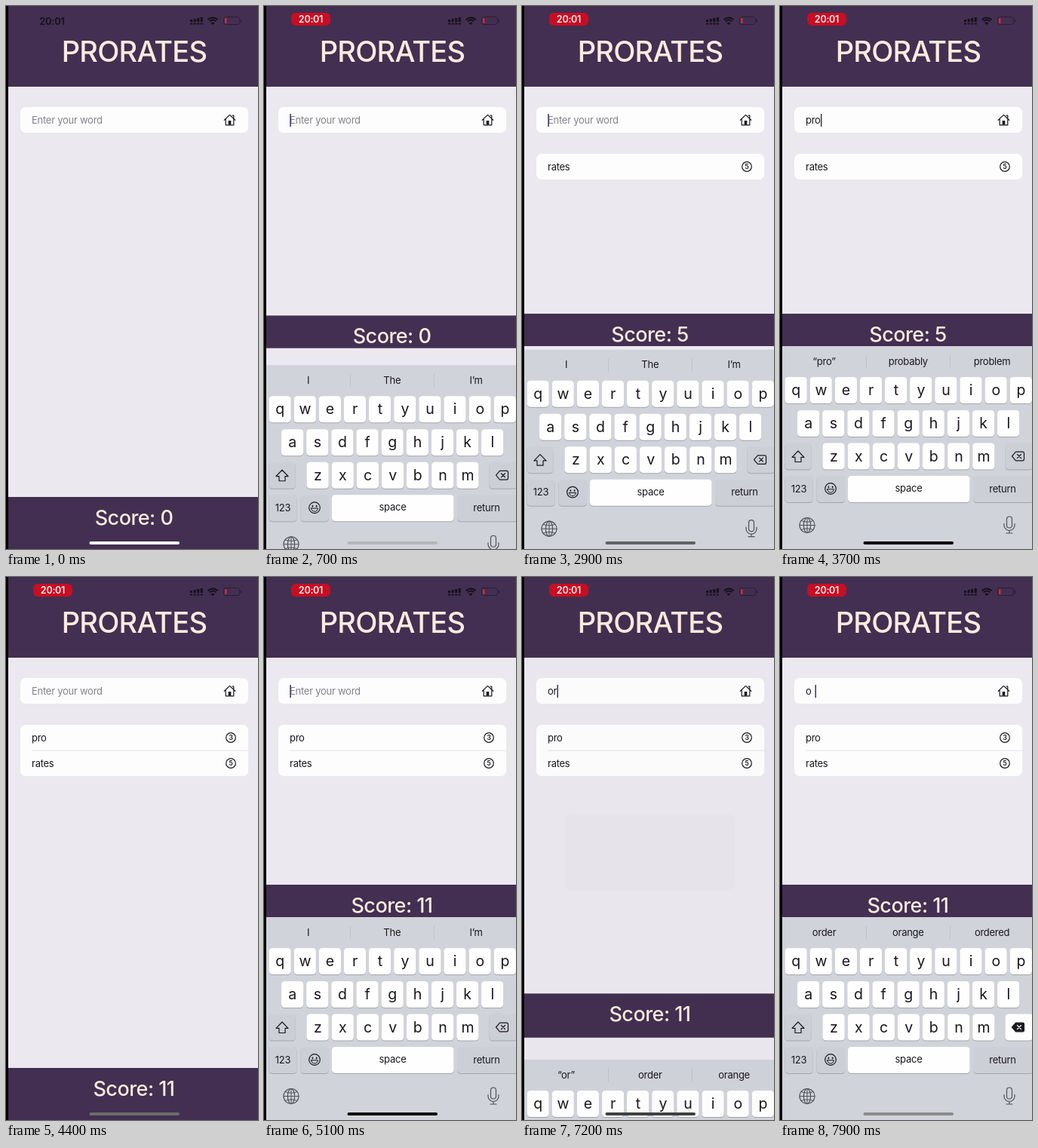
An HTML page with a canvas for the animation above (8000 ms loop, 334x720 px).

```html
<!DOCTYPE html>
<html lang="en">
<head>
<meta charset="utf-8">
<title>Word game</title>
<style>
html, body { margin: 0; width: 100%; height: 100%; overflow: hidden; background: #000; }
canvas { display: block; width: 334px; height: 720px; }
</style>
</head>
<body>
<canvas id="stage"></canvas>
<script>
const W = 334, H = 720, LOOP = 8000;
const PURPLE = '#432f51', CREAM = '#fbebde', PAGE = '#ebe9ef', INK = '#19181c';
const canvas = document.getElementById('stage');
const dpr = window.devicePixelRatio || 1;
canvas.width = W * dpr;
canvas.height = H * dpr;
const c = canvas.getContext('2d');

// Timeline: [time, value] steps
const TYPED = [
  [0, ''], [950, 'r'], [1100, 'ra'], [1300, 'rat'], [1450, 'rate'], [1650, 'rates'], [2150, ''],
  [3150, 'p'], [3350, 'pr'], [3550, 'pro'], [3900, ''], [5350, 'o'], [5600, 'or'], [7850, 'o']
];
const SCORES = [[0, 0], [2200, 5], [3950, 11]];
const SHOWS = [450, 2560, 4560, 7150];
const HIDES = [2100, 3850, 6100];
const ROWS = [{ word: 'rates', at: 2200 }, { word: 'pro', at: 3950 }];
const INDICATOR = [
  [0, 255], [500, 255], [1200, 0], [2250, 0], [2500, 230], [3200, 0], [4100, 0],
  [4600, 180], [5000, 15], [7100, 0], [7500, 255], [8000, 110]
];
const HINTS = {
  '': ['I', 'The', 'I’m'],
  r: ['“r”', 'really', 'right'],
  ra: ['“ra”', 'rather', 'rain'],
  rat: ['“rat”', 'rather', 'rate'],
  rate: ['“rate”', 'rated', 'rates'],
  rates: ['“rates”', 'rated', ''],
  p: ['“p”', 'please', 'people'],
  pr: ['“pr”', 'pretty', 'probably'],
  pro: ['“pro”', 'probably', 'problem'],
  o: ['order', 'orange', 'ordered'],
  or: ['“or”', 'order', 'orange']
};

const clamp = v => Math.max(0, Math.min(1, v));
const span = (t, start, length) => clamp((t - start) / length);
const easeOut = p => 1 - (1 - p) ** 3;
const easeBoth = p => p * p * (3 - 2 * p);
const mix = (a, b, p) => a + (b - a) * p;
const stepAt = (list, t) => list.filter(e => e[0] <= t).pop()?.[1] ?? list[0][1];

function tween(list, t) {
  const i = list.findIndex(e => e[0] > t);
  if (i < 0) return list[list.length - 1][1];
  const [a, b] = [list[i - 1], list[i]];
  return mix(a[1], b[1], (t - a[0]) / (b[0] - a[0]));
}

// Share of the way up for the keyboard and for the score bar
function lift(t) {
  const up = SHOWS.filter(s => s <= t).pop() ?? -1;
  const down = HIDES.filter(s => s <= t).pop() ?? -1;
  if (up < 0) return { keys: 0, bar: 0 };
  if (up > down) return { keys: easeOut(span(t, up, 460)), bar: easeOut(span(t, up, 320)) };
  return { keys: 1 - easeBoth(span(t, down, 260)), bar: 1 - easeBoth(span(t, down + 150, 300)) };
}

function rect(x, y, w, h, fill) {
  c.fillStyle = fill;
  c.fillRect(x, y, w, h);
}

function round(x, y, w, h, r, fill) {
  c.beginPath();
  c.roundRect(x, y, w, h, r);
  c.fillStyle = fill;
  c.fill();
}

function setFont(size, weight = 400, tight = -0.02) {
  c.font = `${weight} ${size}px Inter, Roboto, sans-serif`;
  c.letterSpacing = `${size * tight}px`;
}

function text(str, x, y, size, fill, { weight = 400, align = 'left', tight } = {}) {
  setFont(size, weight, tight);
  c.textAlign = align;
  c.textBaseline = 'alphabetic';
  c.fillStyle = fill;
  c.fillText(str, x, y + size * 0.36);
}

const center = (str, x, y, size, fill, weight = 400) =>
  text(str, x, y, size, fill, { weight, align: 'center' });

function stroke(d, x, y, color = INK, width = 1.2, fill) {
  const path = new Path2D(d);
  c.save();
  c.translate(x, y);
  c.lineWidth = width;
  c.lineJoin = c.lineCap = 'round';
  if (fill) { c.fillStyle = fill; c.fill(path); }
  c.strokeStyle = color;
  c.stroke(path);
  c.restore();
}

function ring(x, y, r, color = INK, width = 1.2) {
  c.beginPath();
  c.arc(x, y, r, 0, Math.PI * 2);
  c.lineWidth = width;
  c.strokeStyle = color;
  c.stroke();
}

function statusIcons() {
  const ink = '#17101d';
  for (let i = 0; i < 4; i++) {
    const x = 244 + i * 4.6;
    rect(x, 18 - i, 3, 3 + i, ink);
    rect(x, 22.5, 3, 2, ink);
  }
  for (const r of [8.6, 5.6]) {
    c.beginPath();
    c.arc(274, 24, r, -Math.PI * 0.77, -Math.PI * 0.23);
    c.lineWidth = 2;
    c.strokeStyle = ink;
    c.stroke();
  }
  c.beginPath();
  c.moveTo(274, 25);
  c.arc(274, 25, 3.4, -Math.PI * 0.77, -Math.PI * 0.23);
  c.fillStyle = ink;
  c.fill();
  c.beginPath();
  c.roundRect(288.5, 14.5, 21, 10, 3);
  c.lineWidth = 1;
  c.strokeStyle = '#2a1e33';
  c.stroke();
  round(290, 16, 2.5, 7, 1, '#e0262f');
  round(310.8, 17.5, 1.3, 4, 0.6, '#2a1e33');
}

function clock(t) {
  const on = span(t, 150, 200);
  c.globalAlpha = 1 - on;
  center('20:01', 61, 20, 13, '#17101d', 600);
  c.globalAlpha = on;
  round(36, 9, 52, 17, 6, '#c90d22');
  center('20:01', 62, 17.5, 12.5, '#fbeef0', 600);
  c.globalAlpha = 1;
}

function field(t) {
  round(19, 134, 302, 34, 7, '#fefdfe');
  const word = stepAt(TYPED, t);
  text(word || 'Enter your word', 34, 151.5, 13, word ? INK : '#828187');
  stroke('M-7.2 .3 L0 -6.6 L7.2 .3 M-5.3 -1 V6.8 H5.3 V-1 M3.6 -5.8 H5.3 V-2', 296.5, 151, INK, 1.2);
  rect(294.7, 152, 3.6, 5.5, INK);
  const focused = SHOWS.some((s, i) => t >= s && t < (HIDES[i] ?? LOOP));
  if (!focused) return;
  setFont(13);
  const end = 34 + c.measureText(stepAt(TYPED, t - 120)).width;
  rect(end + 0.3, 143, 1.5, 17, '#3d2f61');
}

function wordList(t) {
  const live = ROWS.filter(r => t >= r.at);
  if (!live.length) return;
  const grow = live.map(r => easeOut(span(t, r.at, 300)));
  const total = grow.reduce((a, b) => a + b, 0);
  c.save();
  c.globalAlpha = grow[0];
  round(19, 196, 302, 34 * Math.max(1, total), 7, '#fefdfe');
  live.forEach((row, i) => {
    const below = grow.slice(i + 1).reduce((a, b) => a + b, 0);
    const y = 213 + 34 * below;
    c.globalAlpha = grow[i];
    text(row.word, 34, y + 0.5, 13, INK);
    ring(298, y, 6.3);
    center(String(row.word.length), 298, y, 8.5, INK, 600);
    if (i) rect(34, 229.7, 287, 0.8, '#dcdbe0');
  });
  c.restore();
}

function scoreBar(t, up) {
  const top = mix(651, 408, up), bottom = mix(720, 451, up);
  rect(3, top, W - 3, bottom - top, PURPLE);
  center('Score: ' + stepAt(SCORES, t), 169.5, top + 27, 27, CREAM, 500);
}

function key(x, y, w, fill) {
  round(x, y + 1, w, 35, 4.5, '#a4a5ac');
  round(x, y, w, 35, 4.5, fill);
}

function letters(str, x, y) {
  [...str].forEach((ch, i) => {
    const left = x + i * 33.13;
    key(left, y, 29.2, '#fefefe');
    center(ch, left + 14.6, y + 17, 19.5, INK);
  });
}

function keyboard(t, up) {
  if (up <= 0) return;
  c.save();
  c.translate(0, (1 - up) * 269);
  rect(3, 451, W - 3, 269, '#d1d3da');
  HINTS[stepAt(TYPED, t)].forEach((hint, i) => center(hint, 58.5 + i * 111.3, 471, 13, INK));
  for (const x of [114, 225]) rect(x, 463, 0.8, 17, '#bcbec5');

  letters('qwertyuiop', 6.5, 492);
  letters('asdfghjkl', 23, 536);
  letters('zxcvbnm', 56.5, 579.5);
  const soft = '#cdcfd7', erasing = t >= 7800;
  key(6.5, 579.5, 35, soft);
  key(298.5, 579.5, 37, erasing ? '#fefefe' : soft);
  key(6.5, 623, 37, soft);
  key(48.5, 623, 37.5, soft);
  key(90, 623, 161.5, '#fefefe');
  key(256, 623, 80, soft);
  center('123', 25, 640, 13, INK);
  center('space', 170.5, 639.5, 13, INK);
  center('return', 295, 640, 13, INK);

  stroke('M0 -7.5 L8 .8 H4 V7 H-4 V.8 H-8 Z', 24, 597.5);
  stroke('M-8 0 L-3 -5.8 H6 Q8 -5.8 8 -3.8 V3.8 Q8 5.8 6 5.8 H-3 Z', 315.5, 597, INK, 1.2, erasing && INK);
  stroke('M-1 -2.5 L4 2.5 M4 -2.5 L-1 2.5', 315.5, 597, erasing ? '#fff' : INK, 1.2);

  ring(67, 640, 7.3);
  for (const x of [64.4, 69.6]) { c.beginPath(); c.ellipse(x, 638, 0.9, 1.4, 0, 0, 7); c.fillStyle = INK; c.fill(); }
  stroke('M-4.4 .8 H4.4 Q3.6 5 0 5 Q-3.6 5 -4.4 .8 Z', 67, 640, INK, 1);

  const grey = '#50525a';
  ring(36, 688.5, 10, grey);
  c.beginPath();
  c.ellipse(36, 688.5, 4.6, 10, 0, 0, Math.PI * 2);
  c.stroke();
  stroke('M-10 0 H10 M0 -10 V10 M-8 -6 Q0 -2.5 8 -6 M-8 6 Q0 2.5 8 6', 36, 688.5, grey, 1);
  stroke('M-3.5 -7 A3.5 3.5 0 0 1 3.5 -7 V1 A3.5 3.5 0 0 1 -3.5 1 Z', 304, 687.5, grey, 1.2);
  stroke('M-7 -1 V1 A7 7 0 0 0 7 1 V-1 M0 8 V11.5 M-4 11.5 H4', 304, 687.5, grey, 1.2);
  c.restore();
}

function alertBox(t) {
  const show = easeOut(span(t, 6130, 260)) * (1 - easeBoth(span(t, 7000, 220)));
  if (show <= 0) return;
  c.save();
  rect(3, 0, W - 3, H, `rgba(0,0,0,${0.32 * show})`);
  c.globalAlpha = show;
  const scale = t < 7000 ? mix(1.15, 1, show) : 1;
  c.translate(170, 365);
  c.scale(scale, scale);
  c.translate(-170, -365);
  round(57.5, 313.5, 225, 103, 11, '#69676b');
  center('Word is too short', 170, 339, 14, '#d9d7da', 600);
  center('It’s not that easy!', 170, 356.5, 11, '#cfcdd0');
  rect(57.5, 379.5, 225, 0.8, '#5d5b60');
  center('OK', 170, 399, 15, '#aa9bd0');
  c.restore();
}

function draw(t) {
  c.setTransform(dpr, 0, 0, dpr, 0, 0);
  rect(0, 0, W, H, '#000');
  c.save();
  c.beginPath();
  c.rect(3, 0, W - 3, H);
  c.clip();
  rect(3, 0, W, H, PAGE);
  rect(3, 0, W, 107, PURPLE);
  center('PRORATES', 170, 60.5, 38, CREAM, 500);
  const up = lift(t);
  field(t);
  wordList(t);
  scoreBar(t, up.bar);
  keyboard(t, up.keys);
  alertBox(t);
  statusIcons();
  clock(t);
  const tone = Math.round(tween(INDICATOR, t));
  round(110.5, 710, 119.5, 4, 2, `rgb(${tone},${tone},${tone})`);
  c.restore();
}

const begin = performance.now();
function frame() {
  draw((performance.now() - begin) % LOOP);
  requestAnimationFrame(frame);
}
draw(0);
requestAnimationFrame(frame);
</script>
</body>
</html>
```
